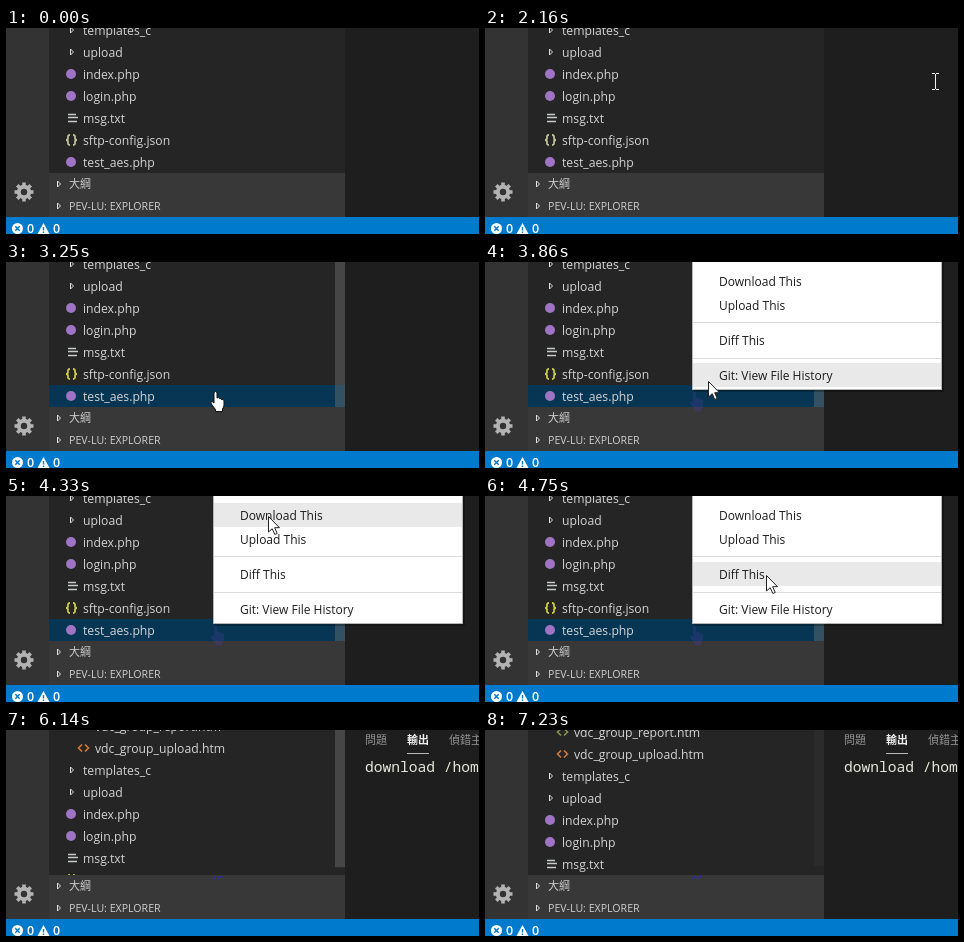
Animation, 473 px wide and 206 px high, one loop 8.67 s. Source, as an HTML page:

```html
<!DOCTYPE html>
<html lang="zh-Hant">
<head>
<meta charset="utf-8">
<title>Diff This</title>
<style>
  html, body { margin: 0; width: 100%; height: 100%; overflow: hidden; background: #1e1e1e; }
  svg { display: block; width: 473px; height: 206px; }
  text { font-family: "Open Sans", "Noto Sans CJK TC", "Noto Sans CJK", sans-serif; white-space: pre; }
  #rows text { font-size: 12.2px; font-weight: 500; fill: #d4d4d4; }
  #sections text { font-size: 10.6px; font-weight: 500; fill: #cfcfcf; }
  #status text { font-size: 12.5px; font-weight: 600; fill: #fff; }
  #menu text { font-size: 12px; fill: #1c1c1c; }
  #panel text { font-size: 11px; fill: #949494; }
  #panel .active { fill: #eee; font-weight: 700; }
  #panel .out { font: 500 14.6px "Noto Sans Mono", monospace; fill: #e6e6da; }
</style>
</head>
<body>
<svg viewBox="0 0 473 206">
  <defs>
    <path id="hand" d="M3.5 12V2.2Q3.5.5 5 .5T6.5 2.2V7Q8 6 9 7.5Q10.8 6.5 11 8.5Q13.5 7.5 13.5 10V14Q13.5 16 12 18V20.5H5V18.5L.8 13Q-.5 10.5 1.5 10.5Z"/>
  </defs>
  <rect width="473" height="206" fill="#1e1e1e"/>
  <g id="panel">
    <text x="359" y="14">問題</text>
    <text x="401" y="14" class="active">輸出</text>
    <text x="443" y="14">偵錯主控台</text>
    <path d="M401 23.5H423" stroke="#b8b8b8"/>
    <text x="359" y="42" class="out">download /home</text>
  </g>

  <rect x="43" width="296" height="189" fill="#252526"/>
  <rect id="hover" x="43" width="296" height="22" fill="#2a2d2e"/>
  <rect id="picked" x="43" y="123" width="296" height="22" fill="#073655"/>
  <g id="rows"></g>
  <rect id="slider" x="329" width="10" fill="#797979"/>

  <g id="sections">
    <rect x="43" y="145" width="296" height="44" fill="#383838"/>
    <path d="M51.5 153L54.5 156L51.5 159ZM51.5 175L54.5 178L51.5 181Z" fill="none" stroke="#e0e0e0"/>
    <text x="63" y="160" style="font-size:11px">大綱</text>
    <text x="63" y="182">PEV-LU: EXPLORER</text>
  </g>
  <use id="ghost" href="#hand" x="204.5" y="129" fill="#4b3a9c" opacity=".3"/>
  <path id="marks" d="M207 149.5L210 146M212 149.5L213 147L217 146.5" fill="none" stroke="#30309a" stroke-width="1.4"/>

  <rect width="43" height="189" fill="#333"/>
  <g transform="translate(18 164)" stroke="#b3b3b3" fill="none">
    <circle r="5.2" stroke-width="4"/>
    <g id="teeth" stroke-width="3.6"></g>
  </g>

  <g id="status">
    <rect y="189" width="473" height="17" fill="#007acc"/>
    <circle cx="11.5" cy="200.5" r="5.5" fill="#fff"/>
    <path d="M9.3 198.3L13.7 202.7M13.7 198.3L9.3 202.7" stroke="#007acc" stroke-width="1.5"/>
    <text x="21" y="205">0</text>
    <path d="M37.5 195L43.5 206H31.5Z" fill="#fff"/>
    <path d="M37.5 199V202.5M37.5 203.5V205" stroke="#007acc" stroke-width="1.4"/>
    <text x="47" y="205">0</text>
  </g>

  <g id="menu">
    <rect x="209" y="0" width="250" height="130" fill="#000" opacity=".3"/>
    <rect x="207.5" y="-2" width="249" height="129.5" fill="#fff" stroke="#b5b5b5"/>
    <rect id="lit" x="208" width="248" height="24" fill="#e9e9e9"/>
    <path d="M208 60.5H456M208 96.5H456" stroke="#dcdcdc"/>
  </g>

  <g id="cursor">
    <path id="beam" d="M-3-7.5H0M1-7.5H4M.5-7V8M-3 8.5H0M1 8.5H4" fill="none" stroke="#f0f0f0"/>
    <use id="point" href="#hand" x="-4.5" fill="#fff" stroke="#111"/>
    <path id="arrow" d="M.5.5V16L4.2 12.7L6.8 18.5L9.2 17.4L6.7 11.7H11.5Z" fill="#fff" stroke="#222"/>
  </g>
</svg>
<script>
const LOOP = 8670;
const $ = id => document.getElementById(id);
const NS = 'http://www.w3.org/2000/svg';

function add(parent, tag, attrs, text) {
  const el = document.createElementNS(NS, tag);
  for (const key in attrs) el.setAttribute(key, attrs[key]);
  if (text) el.textContent = text;
  parent.appendChild(el);
  return el;
}

for (let i = 0; i < 8; i++) {
  add($('teeth'), 'path', { d: 'M0-6V-9.5', transform: `rotate(${i * 45})` });
}

// Icons are drawn around their vertical centre
const line = (d, stroke, width) => g =>
  add(g, 'path', { d, stroke, 'stroke-width': width, fill: 'none' });
const tag = color => line('M76-3.5L72.5 0L76 3.5M79-3.5L82.5 0L79 3.5', color, 1.6);
const folder = line('M64.5-3L67.5 0L64.5 3Z', '#e0e0e0', 1);
const lines = line('M62-3.5H70M62-.5H72M62 3.5H71', '#c8cbca', 1.4);
const braces = line('M64-5Q61.5-5 62-2Q62 0 60 0Q62 0 62 2Q61.5 5 64 5' +
  'M67-5Q69.5-5 69-2Q69 0 71 0Q69 0 69 2Q69.5 5 67 5', 'currentColor', 1.8);
const disc = g => add(g, 'circle', { cx: 65, cy: 0, r: 5, fill: '#a074c4' });

[
  ['vdc_group_report.htm', tag('#8a8f4a'), 89],
  ['vdc_group_upload.htm', tag('#d57a35'), 89],
  ['templates_c', folder],
  ['upload', folder],
  ['index.php', disc],
  ['login.php', disc],
  ['msg.txt', lines],
  ['sftp-config.json', braces],
  ['test_aes.php', disc]
].forEach(([label, icon, x = 77], i) => {
  const row = add($('rows'), 'g', { transform: `translate(0 ${i * 22 - 42})` });
  icon(row);
  add(row, 'text', { x, y: 5 }, label);
});

const items = [['Download This', 19], ['Upload This', 43], ['Diff This', 78], ['Git: View File History', 113]];
for (const [label, y] of items) add($('menu'), 'text', { x: 234, y: y + 5 }, label);

// Steps: start time, then values held until the next step
const pointer = [
  [0, ''], [70, 'arrow', 467, 203], [170, ''],
  [2160, 'beam', 450, 53], [2240, 'beam', 443, 56], [2320, 'beam', 428, 62],
  [2400, 'beam', 403, 72], [2480, 'beam', 368, 85], [2560, 'point', 325, 99],
  [2640, 'point', 285, 111], [2720, 'point', 251, 120], [2800, 'point', 228, 125],
  [2880, 'point', 214, 128], [2950, 'point', 209, 129],
  [3630, 'arrow', 206, 129], [3710, 'arrow', 207, 129],
  [3860, 'arrow', 223, 119], [3960, 'arrow', 233, 99], [4030, 'arrow', 243, 80],
  [4110, 'arrow', 254, 48], [4330, 'arrow', 262, 20], [4410, 'arrow', 269, 3],
  [4500, 'arrow', 276, 36], [4650, 'arrow', 279, 59], [4750, 'arrow', 281, 79],
  [5200, '']
];
const scroll = [[0, 0], [5350, 8], [5430, 16], [5580, 22], [6060, 30], [6140, 38], [6220, 44]];
const sliderFade = [[0, 0], [2560, 0.4], [7230, 0.08]];

const at = (steps, t) => steps.reduce((hit, s) => s[0] <= t ? s : hit);
const show = (id, on) => { $(id).style.display = on ? '' : 'none'; };
const within = (t, a, b) => t >= a && t < b;

function render(t) {
  const [, kind, x = 0, y = 0] = at(pointer, t);
  const shift = at(scroll, t)[1];
  for (const id of ['beam', 'point', 'arrow']) show(id, id === kind);
  $('cursor').setAttribute('transform', `translate(${x} ${y})`);

  $('rows').setAttribute('transform', `translate(0 ${shift})`);
  $('rows').setAttribute('color', t < 2560 ? '#c2c19a' : '#cbcb41');
  $('slider').setAttribute('opacity', at(sliderFade, t)[1]);
  $('slider').setAttribute('height', 145 - shift * 9 / 44);

  const stale = within(t, 5200, 6060);
  show('hover', kind === 'point' || stale);
  $('hover').setAttribute('y', stale ? 79 + shift : Math.floor((y - 13) / 22) * 22 + 13);
  show('picked', within(t, 3250, 5350));

  show('menu', within(t, 3400, 5200));
  const lit = items.find(item => Math.abs(y - item[1]) <= 12);
  show('lit', lit && kind === 'arrow' && t >= 3860);
  if (lit) $('lit').setAttribute('y', lit[1] - 12);

  show('ghost', within(t, 3860, 5350));
  show('marks', t >= 5350);
  show('panel', t >= 5280);
}

const start = performance.now();
function tick() {
  render((performance.now() - start) % LOOP);
  requestAnimationFrame(tick);
}
tick();
</script>
</body>
</html>
```
